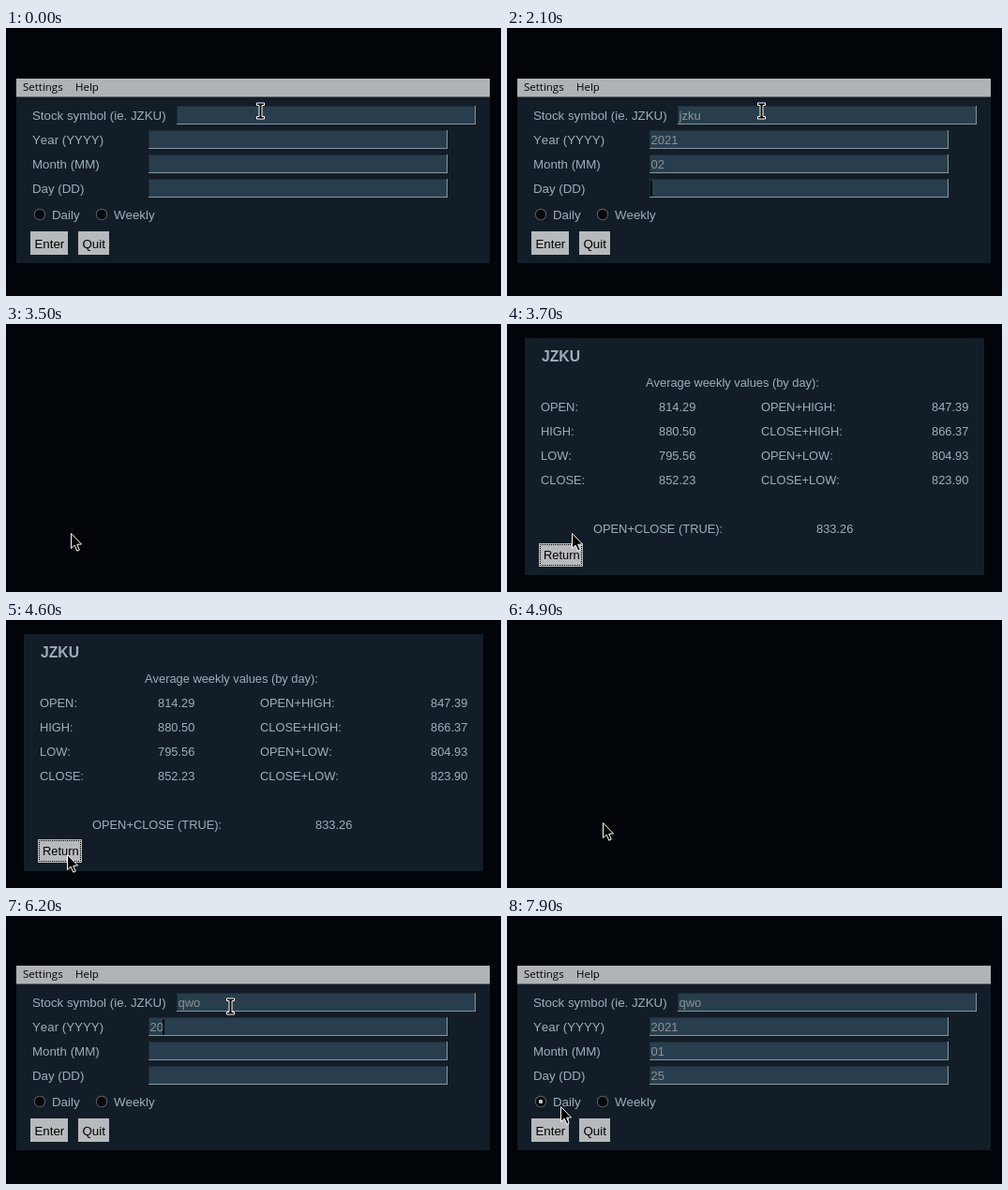
Recreate the animation shown at these times as an HTML page with a canvas. Size 528 px wide and 286 px high, loop 8000 ms.

```html
<!DOCTYPE html>
<html lang="en">
<head>
<meta charset="utf-8">
<title>Stock lookup</title>
<style>
html, body { margin: 0; width: 100%; height: 100%; overflow: hidden; background: #010409; }
canvas { display: block; }
</style>
</head>
<body>
<canvas id="stage" width="528" height="286"></canvas>
<script>
const ctx = document.getElementById('stage').getContext('2d');
ctx.fontKerning = 'none';

const LOOP = 8000, STEP = 100, BLINK = 200;
const ARIAL = '"Liberation Sans", Arial, sans-serif';
const MENU = '11.5px "Open Sans", sans-serif';
const FORM = '13.3px ' + ARIAL;
const TYPED = '13px ' + ARIAL;
const RESULT = '12.85px ' + ARIAL;
const TITLE = 'bold 15.7px ' + ARIAL;

const C = {
  desk: '#010409', panel: '#121d27', menu: '#b0b3b5', label: '#a0aeba',
  entry: '#293e4c', typed: '#88939a', edge: '#8796a0', shade: '#1c2c38',
  button: '#b7babc', pressed: '#94999c', ink: '#05080b', ring: '#596167', dot: '#c3cbd1'
};

const ROW = 26, FIELD_W = 319, FIELD_H = 20;
const FIELDS = ['Stock symbol (ie. JZKU)', 'Year (YYYY)', 'Month (MM)', 'Day (DD)']
  .map((label, i) => ({ label, x: i ? 152 : 182, y: 83 + ROW * i }));

// Bursts of typing: one key per step, tab moves to the next field
const VISITS = [
  { from: 0, to: 3400, dy: 0, focus: -300, radio: 'Weekly', pick: 3000, press: 3300,
    bursts: [[300, 'jzku\t2'], [1000, '021\t'], [1500, '02\t'], [2300, '05']] },
  { from: 5000, to: LOOP, dy: -1, focus: 5300, radio: 'Daily', pick: 7800, press: LOOP,
    bursts: [[5500, 'qwo\t'], [6100, '20'], [6400, '21\t0'], [6900, '1\t25']] }
];
const RESULTS = { from: 3700, to: 4900 };
const PRICE = { OPEN: 814.289, HIGH: 880.5, LOW: 795.563, CLOSE: 852.232 };

// Pointer moves from its resting place
const REST = { x: 271, y: 88 };
const MOVES = [
  { from: 2400, to: 2900, x: 101, y: 200 },
  { from: 3000, to: 3300, x: 58, y: 226 },
  { from: 3400, to: 3500, x: 69, y: 223 },
  { from: 4300, to: 4600, x: 65, y: 250 },
  { from: 4800, to: 4900, x: 102, y: 216 },
  { from: 4900, to: 5300, x: 239, y: 96 },
  { from: 7200, to: 7700, x: 57, y: 203 }
];

const shown = (part, t) => t >= part.from && t < part.to;
const clamp = (v, lo, hi) => Math.min(hi, Math.max(lo, v));

function box(x, y, w, h, color) {
  ctx.fillStyle = color;
  ctx.fillRect(x, y, w, h);
}

function text(str, x, y, font, color) {
  ctx.font = font;
  ctx.fillStyle = color;
  ctx.fillText(str, x, y);
}

function disc(x, y, r, color) {
  ctx.beginPath();
  ctx.arc(x, y, r, 0, 2 * Math.PI);
  ctx.fillStyle = color;
  ctx.fill();
}

function pointerAt(t) {
  const p = MOVES.reduce((at, m) => {
    const k = clamp((t - m.from) / (m.to - m.from), 0, 1), e = k * k * (3 - 2 * k);
    return { x: at.x + (m.x - at.x) * e, y: at.y + (m.y - at.y) * e };
  }, REST);
  return { x: Math.round(p.x), y: Math.round(p.y) };
}

function typingAt({ bursts, focus }, t) {
  let keys = '', last = focus;
  for (const [at, burst] of bursts) {
    const count = clamp(Math.floor((t - at) / STEP) + 1, 0, burst.length);
    keys += burst.slice(0, count);
    if (count) last = at + (count - 1) * STEP;
  }
  // The caret restarts its blink with every key
  const caret = t >= focus && (t - last) % (2 * BLINK) < BLINK;
  return { values: keys.split('\t'), caret };
}

function drawEntry({ x, y }, value, caret) {
  box(x, y, FIELD_W, FIELD_H, C.edge);
  box(x, y, FIELD_W - 1, FIELD_H - 1, C.shade);
  box(x + 1, y + 1, FIELD_W - 2, FIELD_H - 2, C.entry);
  text(value, x + 1.5, y + 15, TYPED, C.typed);
  if (caret) box(x + 1 + Math.floor(ctx.measureText(value).width), y + 2, 2, 17, C.ink);
}

function drawRadio(x, label, on) {
  disc(x, 199, 6.2, C.ring);
  disc(x, 199, 5.2, C.ink);
  if (on) disc(x, 199, 2.2, C.dot);
  text(label, x + 13, 204, FORM, C.label);
}

function drawButton(label, x, y, w, pressed) {
  box(x, y, w, 25, pressed ? C.pressed : C.button);
  text(label, x + 4.5, y + 18, FORM, '#000');
}

function drawForm(visit, t) {
  ctx.save();
  ctx.translate(0, visit.dy);
  box(11, 54, 505, 197, C.panel);
  box(11, 54, 505, 19.5, C.menu);
  text('Settings', 18, 67, MENU, '#000');
  text('Help', 74, 67, MENU, '#000');

  const { values, caret } = typingAt(visit, t);
  FIELDS.forEach((f, i) => {
    text(f.label, 28, f.y + 15, FORM, C.label);
    drawEntry(f, values[i] || '', caret && i === values.length - 1);
  });

  ['Daily', 'Weekly'].forEach((name, i) =>
    drawRadio(36 + 66 * i, name, t >= visit.pick && name === visit.radio));
  drawButton('Enter', 26, 217, 40, t >= visit.press);
  drawButton('Quit', 77, 217, 33, false);
  ctx.restore();
}

function drawResults() {
  const say = (str, x, y) => text(str, x, y, RESULT, C.label);
  const mean = (a, b) => ((PRICE[a] + PRICE[b]) / 2).toFixed(2);

  box(19, 15, 490, 253, C.panel);
  text('JZKU', 37, 40, TITLE, C.label);
  say('Average weekly values (by day):', 148, 67);
  Object.keys(PRICE).forEach((name, i) => {
    const y = 93 + ROW * i;
    const a = i % 2 ? 'CLOSE' : 'OPEN', b = i < 2 ? 'HIGH' : 'LOW';
    say(name + ':', 36, y);
    say(PRICE[name].toFixed(2), 162, y);
    say(`${a}+${b}:`, 271, y);
    say(mean(a, b), 453, y);
  });
  say('OPEN+CLOSE (TRUE):', 92, 223);
  say(mean('OPEN', 'CLOSE'), 330, 223);

  box(34, 234, 47, 25, C.button);
  text('Return', 39, 251, RESULT, '#000');
  ctx.strokeStyle = '#000';
  ctx.lineWidth = 1;
  ctx.setLineDash([1, 1]);
  ctx.lineDashOffset = 0.5;
  ctx.strokeRect(35.5, 235.5, 44, 22);
  ctx.setLineDash([]);
}

function outline(points, { x, y }) {
  ctx.beginPath();
  points.forEach(([px, py]) => ctx.lineTo(x + px + 0.5, y + py + 0.5));
  ctx.closePath();
  ctx.fillStyle = '#000';
  ctx.fill();
  ctx.strokeStyle = '#fff';
  ctx.lineWidth = 1;
  ctx.stroke();
}

function drawArrow(p) {
  outline([[0, 0], [0, 16], [3.7, 12.7], [6.3, 18.7], [8.8, 17.6], [6.2, 11.8], [11, 11.5]], p);
}

function drawBeam(p) {
  const half = [[1.5, -6], [4, -6], [4, -8.5], [-4, -8.5], [-4, -6], [-1.5, -6]];
  outline([...half, ...half.map(([x, y]) => [-x, -y])], p);
}

function draw(t) {
  box(0, 0, 528, 286, C.desk);
  const visit = VISITS.find(v => shown(v, t));
  if (visit) drawForm(visit, t);
  if (shown(RESULTS, t)) drawResults();

  const p = pointerAt(t);
  const inField = f => {
    const dx = p.x - f.x, dy = p.y - visit.dy - f.y;
    return dx >= 0 && dx < FIELD_W && dy >= 0 && dy < FIELD_H;
  };
  (visit && FIELDS.some(inField) ? drawBeam : drawArrow)(p);
}

const start = performance.now();
function tick() {
  const t = (performance.now() - start) % LOOP;
  draw(Math.floor(t / STEP) * STEP);
  requestAnimationFrame(tick);
}
tick();
</script>
</body>
</html>
```
